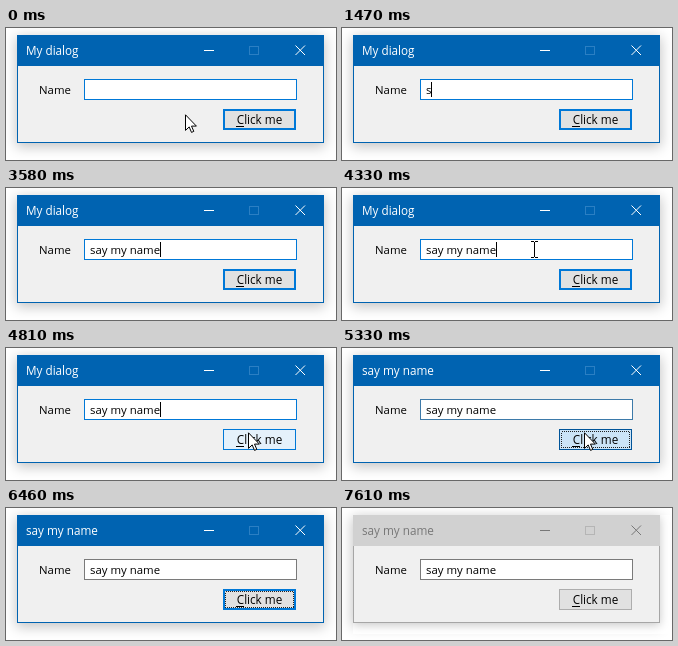
An HTML page for the animation above (7.71 s loop, 330 by 132 pixels).

```html
<!DOCTYPE html>
<html lang="en">
<head>
<meta charset="utf-8">
<title>Dialog demo</title>
<style>
  html, body { margin: 0; width: 100%; height: 100%; overflow: hidden; background: #fff; }
  #stage { position: relative; width: 330px; height: 132px; overflow: hidden; }
  .shadow { position: absolute; left: 11px; top: 7px; width: 307px; height: 108px;
            box-shadow: 0 3px 12px 1px rgba(0, 0, 0, .23); }
  #fade { position: absolute; left: 11px; top: 7px; width: 317px; height: 119px;
          overflow: hidden; background: #fff; visibility: hidden; }
  #fade .shadow { left: 0; top: 0; box-shadow: 0 2px 9px rgba(0, 0, 0, .22); }
  svg { position: absolute; left: 0; top: 0; }
  text { font: 11.4px "Open Sans", "Noto Sans", sans-serif; fill: #000; white-space: pre; }
  text.wide { font-size: 11.7px; }
  .line { fill: none; stroke-width: 1; }

  #win { --bar: #0063b1; --edge: #0063b1; --ink: #fff; --dim: #2b7fc3; }
  .off #win { --bar: #d1d1d1; --edge: #a6a6a6; --ink: #777; --dim: #b5b5b5; }
  .off #fade { visibility: visible; }
  #bar { fill: var(--bar); }
  #body { fill: #f0f0f0; stroke: var(--edge); }
  #title { fill: var(--ink); }
  #icons { stroke: var(--ink); }
  #max { stroke: var(--dim); }
</style>
</head>
<body>
<div id="stage">
  <div class="shadow"></div>
  <div id="fade"><div class="shadow"></div></div>
  <svg width="330" height="132" viewBox="0 0 330 132">
    <g id="win">
      <rect id="body" x="11.5" y="7.5" width="306" height="107"/>
      <rect id="bar" x="11" y="7" width="307" height="31"/>
      <text id="title" class="wide" x="20" y="27"></text>
      <path id="icons" class="line" d="M198 22.5h10M289.5 17.5l9.5 9.5m0-9.5l-9.5 9.5"/>
      <rect id="max" class="line" x="243.5" y="18.5" width="9" height="8"/>
    </g>

    <text x="33" y="66">Name</text>
    <rect id="box" x="78.5" y="51.5" width="212" height="20" fill="#fff"/>
    <text id="typed" x="84" y="66"></text>
    <rect id="caret" y="54" width="1" height="15"/>

    <rect id="btn" x="217.5" y="81.5" width="72" height="20"/>
    <rect id="inner" class="line" x="218.5" y="82.5" width="70" height="18" stroke="#0078d7"/>
    <rect id="focus" class="line" x="219.5" y="83.5" width="68" height="16"
          stroke="#222" stroke-dasharray="1 1" shape-rendering="crispEdges"/>
    <text class="wide" x="253.5" y="96" text-anchor="middle">Click me</text>
    <path class="line" stroke="#000" d="M230 98.5h8"/>

    <path id="beam" class="line" stroke="#000"
          d="M0 .5h3m1 0h3M3.5 1v15M0 16.5h3m1 0h3"/>
    <path id="arrow" fill="#fff" stroke="#000"
          d="M.5 .8V16.4L4.2 12.9L6.5 18.4L8.8 17.4L6.5 12.1H11.4Z"/>
  </svg>
</div>
<script>
const LOOP = 7710;
const PHRASE = "say my name";
const $ = id => document.getElementById(id);

// Time at which each letter of the phrase appears
const keys = [1470, 1590, 1840, 1960, 2330, 2450, 2570, 2690, 2810, 2930, 3080];

// [time, caret visible]
const blink = [
  [0, 0], [240, 1], [610, 0], [730, 1], [980, 0], [1230, 1], [2210, 0], [2330, 1],
  [3330, 0], [3580, 1], [3820, 0], [4210, 1], [4570, 0], [4810, 1], [5060, 0]
];

// [time, shape, x, y]
const pointer = [
  [0, "arrow", 179, 86], [120, "arrow", 178, 76], [240, "beam", 178, 53],
  [360, "beam", 180, 53], [610, "beam", 181, 52], [730, "beam", 181, 53],
  [1230, "beam", 180, 52], [1350, "beam", 178, 51], [1470, ""],
  [3700, "beam", 176, 52], [3820, "beam", 177, 51], [3940, "beam", 177, 50],
  [4090, "beam", 181, 47], [4210, "beam", 186, 46], [4330, "beam", 189, 53],
  [4450, "beam", 204, 55], [4570, "arrow", 226, 75], [4690, "arrow", 239, 82],
  [4810, "arrow", 242, 84], [6070, "arrow", 244, 85], [6220, "arrow", 255, 94],
  [6340, "arrow", 285, 113], [6460, ""]
];

// [time, fill, border, thick border]
const button = [
  [0, "#e1e1e1", "#0078d7", 1], [4690, "#e3e9ee", "#0078d7", 0],
  [4810, "#e5f1fb", "#0078d7", 0], [5210, "#d8eaf9", "#0067b8", 0],
  [5330, "#cce4f7", "#005499", 0], [5450, "#d8eaf9", "#0067b8", 0],
  [5570, "#e5f1fb", "#0078d7", 0], [6340, "#e3e9ee", "#0078d7", 0],
  [6460, "#e1e1e1", "#0078d7", 1], [7610, "#e1e1e1", "#adadad", 0]
];

// [time, border]
const field = [[0, "#0078d7"], [5210, "#1f79c0"], [5330, "#3d7aa9"], [5450, "#7a7a7a"]];

const at = (list, t) => list.findLast(row => row[0] <= t);
const show = (id, on) => $(id).setAttribute("visibility", on ? "visible" : "hidden");
const paint = (id, key, value) => $(id).setAttribute(key, value);

function draw(t) {
  const off = t >= 7610;
  $("stage").className = off ? "off" : "";
  $("title").textContent = t < 5330 ? "My dialog" : PHRASE;

  const count = keys.filter(k => k <= t).length;
  const typed = $("typed");
  typed.textContent = PHRASE.slice(0, count);
  paint("caret", "x", 84 + Math.round(count ? typed.getComputedTextLength() : 0));
  show("caret", at(blink, t)[1]);
  paint("box", "stroke", at(field, t)[1]);

  const [, fill, border, thick] = at(button, t);
  paint("btn", "fill", fill);
  paint("btn", "stroke", border);
  show("inner", thick);
  show("focus", t >= 5210 && !off);

  const [, shape, x, y] = at(pointer, t);
  for (const id of ["beam", "arrow"]) show(id, id === shape);
  if (shape) paint(shape, "transform", `translate(${x} ${y})`);
}

let start;
function tick(now) {
  start ??= now;
  draw((now - start) % LOOP);
  requestAnimationFrame(tick);
}
draw(0);
requestAnimationFrame(tick);
</script>
</body>
</html>
```
